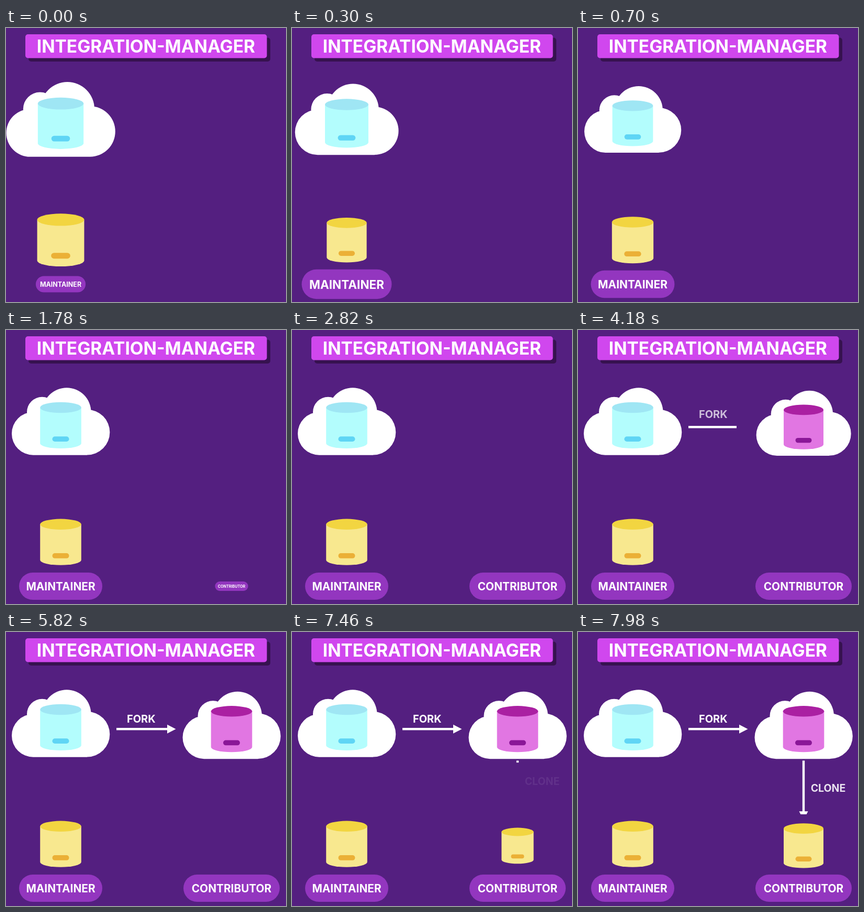
Write an HTML page with a canvas that moves like this. It is 535 px wide and 523 px high and loops after 8 s.

```html
<!DOCTYPE html>
<html lang="en">
<head>
<meta charset="utf-8">
<title>Integration-Manager workflow</title>
<style>
  html, body { margin: 0; width: 100%; height: 100%; overflow: hidden; background: #541f80; }
  canvas { display: block; }
</style>
</head>
<body>
<canvas id="stage" width="535" height="523"></canvas>
<script>
const ctx = document.getElementById('stage').getContext('2d');
const LOOP = 8000;
const TAU = 2 * Math.PI;
const CLOUD_SPEED = 0.75;

const BLUE = { body: '#b3fdfd', top: '#9fe6f4', bar: '#5fd5f5' };
const YELLOW = { body: '#f8e88f', top: '#f2d541', bar: '#ebb036' };
const PINK = { body: '#e176e2', top: '#aa20a2', bar: '#8a1797' };

const progress = (t, start, duration) => Math.min(1, Math.max(0, (t - start) / duration));

// Damped oscillation from 0 to 1.
function elastic(t, start, speed = 1) {
  const s = (t - start) / 1000 * speed;
  return s <= 0 ? 0 : 1 - Math.exp(-5.3 * s) * Math.cos(TAU * s / 0.6);
}

function backOut(p) {
  const q = p - 1;
  return 1 + 2.7 * q ** 3 + 1.7 * q ** 2;
}

function scaledAt(x, y, scale, draw) {
  if (scale <= 0) return;
  ctx.save();
  ctx.translate(x, y);
  ctx.scale(scale, scale);
  draw();
  ctx.restore();
}

function roundBox(x, y, w, h, r, color) {
  ctx.fillStyle = color;
  ctx.beginPath();
  ctx.roundRect(x, y, w, h, r);
  ctx.fill();
}

function label(text, x, y, size, alpha = 1) {
  ctx.save();
  ctx.globalAlpha = alpha;
  ctx.fillStyle = '#fff';
  ctx.font = `700 ${size}px Inter, "Open Sans", sans-serif`;
  ctx.textAlign = 'center';
  ctx.fillText(text, x, y + size * 0.364);
  ctx.restore();
}

function cloud(x, y, scale) {
  scaledAt(x, y, scale, () => {
    ctx.fillStyle = '#fff';
    ctx.beginPath();
    ctx.rect(-52.5, -18, 103, 82);
    for (const [cx, cy, r] of [[-52.5, 23, 41], [50.5, 20.5, 43.3], [11.5, -18, 46.5], [-35.5, -18, 29]]) {
      ctx.moveTo(cx + r, cy);
      ctx.arc(cx, cy, r, 0, TAU);
    }
    ctx.fill();
  });
}

function cylinder(x, y, scale, colors) {
  scaledAt(x, y, scale, () => {
    ctx.fillStyle = colors.body;
    ctx.beginPath();
    ctx.moveTo(-39.3, -34);
    ctx.lineTo(-39.3, 34.3);
    ctx.ellipse(0, 34.3, 39.3, 9.7, 0, Math.PI, 0, true);
    ctx.lineTo(39.3, -34);
    ctx.fill();
    ctx.fillStyle = colors.top;
    ctx.beginPath();
    ctx.ellipse(0, -34, 39.3, 10.2, 0, 0, TAU);
    ctx.fill();
    roundBox(-16, 21.3, 32, 9.7, 4.85, colors.bar);
  });
}

function pill(text, x, width, scale) {
  scaledAt(x, 489, scale, () => {
    roundBox(-width / 2, -26, width, 52, 26, '#9336bf');
    label(text, 0, 0.5, 20.8);
  });
}

// Arrow pointing along +x, wiped in from its tail.
function arrow(x, y, angle, shown) {
  if (shown <= 0) return;
  ctx.save();
  ctx.translate(x, y);
  ctx.rotate(angle);
  ctx.beginPath();
  ctx.rect(0, -10, 114 * shown, 20);
  ctx.clip();
  ctx.fillStyle = '#fff';
  ctx.fillRect(0, -2.2, 98, 4.4);
  ctx.beginPath();
  ctx.moveTo(97, -8.5);
  ctx.lineTo(113.5, 0);
  ctx.lineTo(97, 8.5);
  ctx.fill();
  ctx.restore();
}

function slidingLabel(text, x, y, size, p) {
  if (p > 0) label(text, x, y - 16 * (1 - p), size, p);
}

function draw(t) {
  ctx.fillStyle = '#541f80';
  ctx.fillRect(0, 0, 535, 523);

  roundBox(43, 18.5, 462, 45.5, 5, '#36124f');
  roundBox(37, 12, 461.5, 45.5, 5, '#d047ee');
  label('INTEGRATION-MANAGER', 267.3, 34.8, 33.4);

  const cloudScale = elastic(t, -236, CLOUD_SPEED);
  cloud(104.5, 174.7, cloudScale);
  cylinder(104.5, 182, cloudScale, BLUE);
  cylinder(104.5, 404.8, elastic(t, -187), YELLOW);
  pill('MAINTAINER', 104.5, 159, elastic(t, -84));
  pill('CONTRIBUTOR', 431, 184, backOut(progress(t, 1765, 195)));

  const forkScale = elastic(t, 3520, CLOUD_SPEED);
  cloud(431, 178.2, forkScale);
  cylinder(431, 185.3, forkScale, PINK);
  arrow(211, 185.2, 0, progress(t, 3697, 600));
  slidingLabel('FORK', 258.3, 165.3, 20, progress(t, 3720, 650));

  cylinder(431, 408, elastic(t, 7350), YELLOW);
  arrow(431, 245.3, Math.PI / 2, progress(t, 7440, 600));
  slidingLabel('CLONE', 478, 300, 19.5, progress(t, 7410, 650));
}

const begin = performance.now();
function tick() {
  draw((performance.now() - begin) % LOOP);
  requestAnimationFrame(tick);
}
tick();
</script>
</body>
</html>
```
